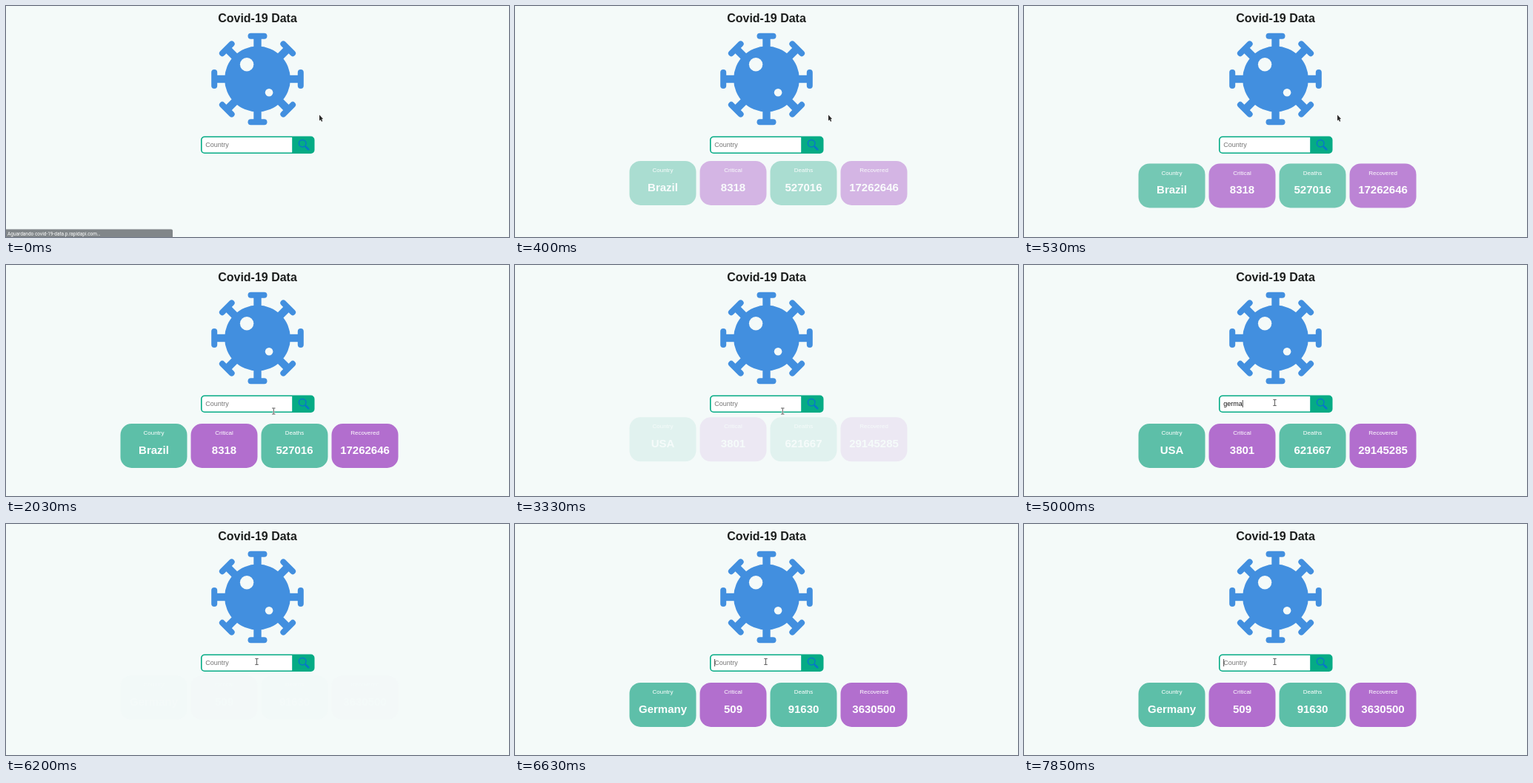
These frames come from a looping animation (679 px wide and 313 px high, 8000 ms). An HTML page with a canvas:

```html
<!DOCTYPE html>
<html lang="en">
<head>
<meta charset="utf-8">
<title>Covid-19 Data</title>
<style>
  html, body { margin: 0; width: 100%; height: 100%; overflow: hidden; background: #f4faf9; }
  canvas { display: block; width: 679px; height: 313px; }
</style>
</head>
<body>
<canvas id="stage"></canvas>
<script>
const W = 679, H = 313, LOOP = 8000, FADE = 500;
const canvas = document.getElementById('stage');
const ctx = canvas.getContext('2d');
const ratio = window.devicePixelRatio || 1;
canvas.width = W * ratio;
canvas.height = H * ratio;

const SANS = '"Liberation Sans", Arial, sans-serif';
const BG = [244, 250, 249], WHITE = [255, 255, 255];
const GREEN = [93, 191, 168], PURPLE = [178, 110, 206];
const BLUE = '#428fdf', TEAL = '#05ab85';
const LABELS = ['Country', 'Critical', 'Deaths', 'Recovered'];

const results = [
  { at: 270, start: 257, values: ['Brazil', '8318', '527016', '17262646'] },
  { at: 3330, start: 3270, values: ['USA', '3801', '621667', '29145285'] },
  { at: 6200, start: 6185, values: ['Germany', '509', '91630', '3630500'] }
];

// The later fades advance only at these moments.
const ticks = [3330, 3520, 3680, 3830, 6200, 6320, 6430, 6630, 6830];

const typing = [
  { at: 0, text: '' },
  { at: 2400, text: 'us' }, { at: 2570, text: 'usa' }, { at: 3330, text: '' },
  { at: 4620, text: 'g' }, { at: 4750, text: 'ger' }, { at: 4880, text: 'germ' },
  { at: 5000, text: 'germa' }, { at: 5230, text: 'german' }, { at: 5480, text: 'germany' },
  { at: 6200, text: '' }
];

const caretSpans = [
  [1520, 2030], [2400, 3170], [3680, 4270], [4620, 6070], [6630, 7270], [7850, LOOP]
];

const pointer = [
  { at: 0, x: 423, y: 147.5, arrow: true },
  { at: 1220, x: 350, y: 196.5 }, { at: 1700, x: 352.5, y: 197 },
  { at: 1880, x: 361.3, y: 198 }, { at: 4120, x: 361, y: 195 },
  { at: 4380, x: 338.5, y: 186.5 }
];

const latest = (list, t) => list.filter(item => item.at <= t).pop();
const mix = (a, b, p) => `rgb(${a.map((v, i) => Math.round(v + (b[i] - v) * p))})`;

// CSS "ease" timing: cubic-bezier(.25, .1, .25, 1)
function ease(x) {
  if (x <= 0) return 0;
  if (x >= 1) return 1;
  const bezier = (a, b, s) => 3 * a * s * (1 - s) ** 2 + 3 * b * s * s * (1 - s) + s ** 3;
  let lo = 0, hi = 1;
  for (let i = 0; i < 24; i++) {
    const mid = (lo + hi) / 2;
    if (bezier(0.25, 0.25, mid) < x) lo = mid; else hi = mid;
  }
  return bezier(0.1, 1, lo);
}

function text(str, x, y, font, color, align = 'center') {
  ctx.font = font;
  ctx.fillStyle = color;
  ctx.textAlign = align;
  ctx.fillText(str, x, y);
}

function box(x, y, w, h, radius, fill) {
  ctx.beginPath();
  ctx.roundRect(x, y, w, h, radius);
  ctx.fillStyle = fill;
  ctx.fill();
}

function disc(x, y, r, fill) {
  ctx.beginPath();
  ctx.arc(x, y, r, 0, Math.PI * 2);
  ctx.fillStyle = fill;
  ctx.fill();
}

function line(points, width, color, cap = 'butt') {
  ctx.beginPath();
  points.forEach(([x, y]) => ctx.lineTo(x, y));
  ctx.lineWidth = width;
  ctx.lineCap = cap;
  ctx.strokeStyle = color;
  ctx.stroke();
}

function drawVirus() {
  ctx.save();
  ctx.translate(339.5, 99);
  for (let i = 0; i < 8; i++) {
    box(-5.2, -58, 10.4, 24, 0, BLUE);
    box(-13, -62.3, 26, 8, 4, BLUE);
    ctx.rotate(Math.PI / 4);
  }
  disc(0, 0, 44.4, BLUE);
  disc(-14.4, -19.7, 9.2, mix(BG, BG, 0));
  disc(15.6, 18.2, 5.3, mix(BG, BG, 0));
  ctx.restore();
}

function drawSearch(t) {
  box(263, 176.5, 153.5, 23.5, 5, TEAL);
  box(264.6, 178.1, 121.6, 20.3, [3.5, 0, 0, 3.5], '#fff');

  const typed = latest(typing, t).text;
  const font = '9px ' + SANS;
  text(typed || 'Country', 269.2, 191, font, typed ? '#111' : '#757575', 'left');
  if (caretSpans.some(([from, to]) => t >= from && t < to)) {
    ctx.fillStyle = '#222';
    ctx.fillRect(269.3 + ctx.measureText(typed).width, 183, 0.8, 10);
  }

  const blue = '#0878c8';
  ctx.beginPath();
  ctx.arc(400.2, 186.2, 4.8, 0, Math.PI * 2);
  ctx.lineWidth = 1.5;
  ctx.strokeStyle = blue;
  ctx.stroke();
  line([[403.6, 189.6], [405.2, 191.2]], 1.5, blue);
  line([[405.2, 191.2], [408.2, 194.2]], 2.7, blue, 'round');
}

function drawCards(t) {
  const result = latest(results, t);
  if (!result) return;
  const tick = result === results[0] ? t : ticks.filter(at => at <= t).pop();
  const p = ease((tick - result.start) / FADE);
  const top = 215 - 10 * (1 - p);
  const ink = mix(BG, WHITE, p);
  LABELS.forEach((label, i) => {
    const x = 154.5 + 95 * i;
    box(x, top, 90, 60, 15, mix(BG, i % 2 ? PURPLE : GREEN, p));
    text(label, x + 45, top + 15.2, '8px ' + SANS, ink);
    text(result.values[i], x + 45, top + 40.8, 'bold 15px ' + SANS, ink);
  });
}

function drawStatus() {
  box(0, 302.5, 225, 11, [0, 2, 0, 0], '#818689');
  text('Aguardando covid-19-data.p.rapidapi.com…', 2, 310.6, '6.5px Roboto, sans-serif', '#fff', 'left');
}

function drawPointer(t) {
  const { x, y, arrow } = latest(pointer, t);
  ctx.save();
  ctx.translate(x, y);
  if (arrow) {
    ctx.beginPath();
    [[0, 0], [0, 8], [1.7, 6.5], [3, 9.2], [4.3, 8.6], [3.1, 6], [5, 5.5]]
      .forEach(([px, py]) => ctx.lineTo(px, py));
    ctx.closePath();
    ctx.lineWidth = 0.8;
    ctx.strokeStyle = '#fff';
    ctx.stroke();
    ctx.fillStyle = '#2b2b2b';
    ctx.fill();
  } else {
    for (const [width, color] of [[2, '#fff'], [1.1, '#666']]) {
      line([[0, -3.8], [0, 3.8]], width, color);
      line([[-2.2, -4], [2.2, -4]], width, color);
      line([[-2.2, 4], [2.2, 4]], width, color);
    }
  }
  ctx.restore();
}

function render(t) {
  ctx.setTransform(ratio, 0, 0, ratio, 0, 0);
  ctx.fillStyle = mix(BG, BG, 0);
  ctx.fillRect(0, 0, W, H);
  text('Covid-19 Data', 339.5, 21.6, 'bold 16px ' + SANS, '#1c1e1d');
  drawVirus();
  drawSearch(t);
  drawCards(t);
  if (t < 270) drawStatus();
  drawPointer(t);
}

const begin = performance.now();
function frame() {
  render((performance.now() - begin) % LOOP);
  requestAnimationFrame(frame);
}
frame();
</script>
</body>
</html>
```
